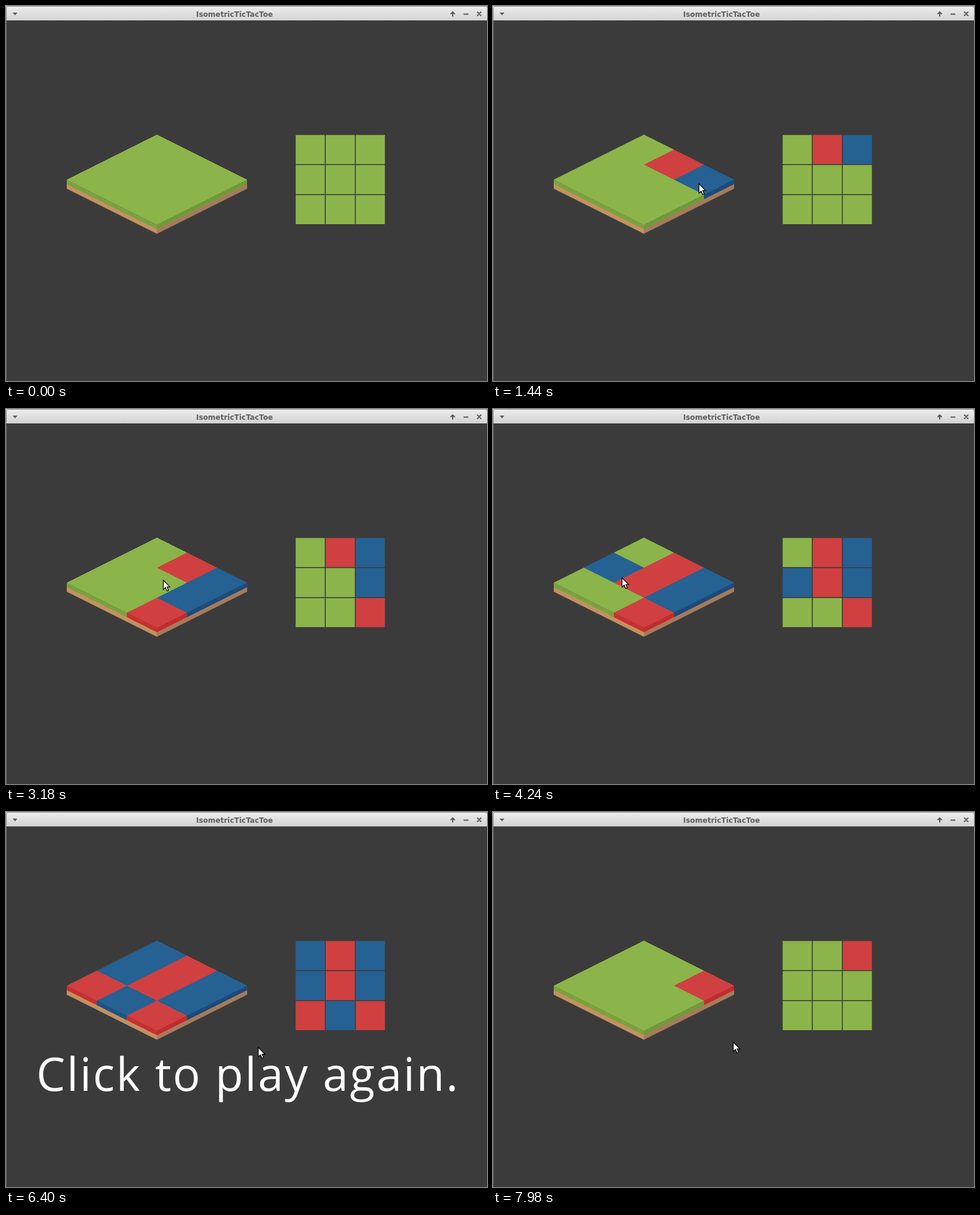
Write an HTML page that moves like this. It is 800 px wide and 624 px high and loops after 8 s.

```html
<!DOCTYPE html>
<html lang="en">
<head>
<meta charset="utf-8">
<title>IsometricTicTacToe</title>
<style>
  html, body { margin: 0; width: 100%; height: 100%; overflow: hidden; background: #3b3b3b; }
  svg { display: block; }
  .green { --top: #8bb44a; --left: #7aa23f; --right: #71983a; }
  .red   { --top: #d04040; --left: #c92f31; --right: #c42a2d; }
  .blue  { --top: #256193; --left: #1f5284; --right: #1e4a79; }
  .top { fill: var(--top); }
  .left { fill: var(--left); }
  .right { fill: var(--right); }
  .tile { shape-rendering: crispEdges; }
  .title { font: bold 12px "DejaVu Sans", sans-serif; fill: #5e5e5e; }
  .message { font: 76px "Open Sans", sans-serif; letter-spacing: 2.55px; fill: #fff; }
  .icons { fill: none; stroke: #5a5a5a; stroke-width: 2; }
</style>
</head>
<body>
<svg width="800" height="624" viewBox="0 0 800 624">
  <defs>
    <linearGradient id="bar" x2="0" y2="1">
      <stop stop-color="#ededed"/><stop offset="1" stop-color="#d2d2d2"/>
    </linearGradient>
  </defs>
  <rect width="800" height="624" fill="#3b3b3b"/>
  <path d="M.5 24V624" stroke="#6a6a6a"/>
  <rect width="800" height="24" fill="#fff"/>
  <path d="M0 24V4Q0 0 4 0H798Q801 0 801 4V24Z" fill="#8a8a8a"/>
  <path d="M1 24V4Q1 1 4 1H797Q800 1 800 4V24Z" fill="url(#bar)"/>
  <text class="title" x="380" y="18" text-anchor="middle">IsometricTicTacToe</text>
  <path d="M11 11H19L15 15.5Z" fill="#5a5a5a"/>
  <path class="icons" d="M743 17.5V10M739.5 13.5L743 10L746.5 13.5M761 13.5H769M783.5 9.5L790.5 16.5M790.5 9.5L783.5 16.5"/>
  <g id="board">
    <path d="M101 290L251 365V379L101 304Z" fill="#c29160"/>
    <path d="M401 290L251 365V379L401 304Z" fill="#a57b5c"/>
  </g>
  <text class="message" id="message" x="50.4" y="464">Click to play again.</text>
  <path id="cursor" d="M.6 .8V16.4L4.2 13L6.8 18.8L9.3 17.7L6.8 12.1H11.6Z" fill="#fff" stroke="#000" stroke-width="1.2"/>
</svg>
<script>
const LOOP = 8000, STEP = 20, RESET = 7980;

// Cells in playing order; blue clicks and red replies one step later.
const game = [2, 1, 5, 8, 3, 4, 7, 6, 0];
const clicks = [1000, 1800, 3580, 4560, 5620];
const playTime = turn => clicks[turn >> 1] + turn % 2 * STEP;

// Pointer enters at the right and glides from stop to stop.
const entry = { x: 776, y: 306, start: 220 };
const glides = [
  { end: 400, lasts: 180, x: 434, y: 255 },
  { end: 860, lasts: 320, x: 370, y: 283 },
  { end: 1660, lasts: 400, x: 308, y: 310 },
  { end: 3340, lasts: 340, x: 219, y: 260 },
  { end: 4360, lasts: 200, x: 206, y: 309 },
  { end: 5320, lasts: 320, x: 259, y: 240 },
  { end: 5820, lasts: 40, x: 419, y: 391 },
  { end: 7000, lasts: 120, x: 399, y: 382 }
];

const $ = id => document.getElementById(id);
const board = $('board'), message = $('message'), cursor = $('cursor');

function add(parent, name, attrs) {
  const el = document.createElementNS('http://www.w3.org/2000/svg', name);
  for (const key in attrs) el.setAttribute(key, attrs[key]);
  return parent.appendChild(el);
}

function makeCell(index) {
  const row = Math.floor(index / 3), col = index % 3;
  const x = 251 + (col - row) * 50, y = 214 + (col + row) * 25;
  const cell = add(board, 'g', {});
  if (row === 2) add(cell, 'path', { class: 'left', d: `M${x} ${y + 50}v7.5l-50 -25v-7.5z` });
  if (col === 2) add(cell, 'path', { class: 'right', d: `M${x} ${y + 50}v7.5l50 -25v-7.5z` });
  add(cell, 'path', { class: 'top tile', d: `M${x} ${y}l50 25l-50 25l-50 -25z` });
  add(cell, 'rect', { class: 'top', x: 481.8 + col * 50, y: 214.6 + row * 50, width: 48.4, height: 48.4 });
  return cell;
}

const cells = Array.from({ length: 9 }, (_, index) => makeCell(index));

function cellColour(index, t) {
  const turn = game.indexOf(index);
  if (t >= RESET) return turn === 0 ? 'red' : 'green';
  if (t < playTime(turn)) return 'green';
  return turn % 2 ? 'red' : 'blue';
}

function placeCursor(t) {
  cursor.style.display = t < entry.start ? 'none' : '';
  let { x, y } = entry;
  for (const stop of glides) {
    const k = Math.min(1, Math.max(0, 1 - (stop.end - t) / stop.lasts));
    x += (stop.x - x) * k;
    y += (stop.y - y) * k;
  }
  cursor.setAttribute('transform', `translate(${Math.round(x)} ${Math.round(y)})`);
}

function draw(now) {
  const t = Math.floor(now % LOOP / STEP) * STEP;
  cells.forEach((cell, index) => cell.setAttribute('class', cellColour(index, t)));
  message.style.display = t > clicks[4] && t < RESET ? '' : 'none';
  placeCursor(t);
}

const origin = performance.now();
function tick() {
  draw(performance.now() - origin);
  requestAnimationFrame(tick);
}
tick();
</script>
</body>
</html>
```
